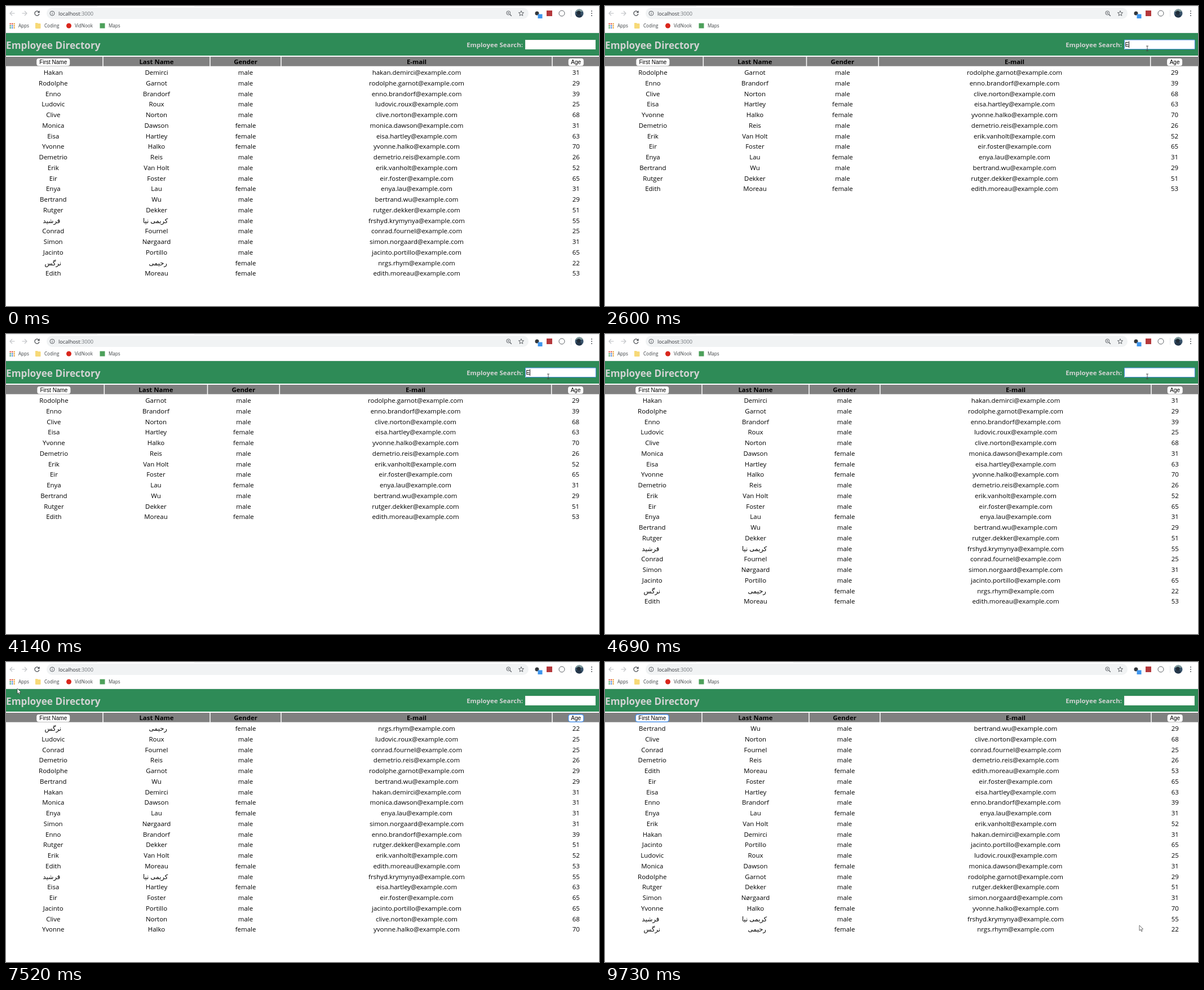
An HTML page with a canvas for the animation above (9.85 s loop, 1052 px wide and 532 px high).

```html
<!DOCTYPE html>
<html lang="en">
<head>
<meta charset="utf-8">
<title>Employee Directory</title>
<style>
html, body { margin: 0; width: 100%; height: 100%; overflow: hidden; background: #fff; }
canvas { display: block; width: 1052px; height: 532px; }
</style>
</head>
<body>
<canvas id="stage"></canvas>
<script>
const W = 1052, H = 532, LOOP = 9850;
const canvas = document.getElementById('stage');
const ctx = canvas.getContext('2d');
const dpr = window.devicePixelRatio || 1;
canvas.width = W * dpr;
canvas.height = H * dpr;

const SANS = '"Open Sans", "Noto Sans", "DejaVu Sans", sans-serif';
const UI = '"Liberation Sans", Arial, sans-serif';
const CELL = '11.46px ' + SANS;
const HEAD = 'bold 11.45px ' + SANS;
const BLUE = '#4a90e8';

const staff = `Hakan,Demirci,m,31
Rodolphe,Garnot,m,29
Enno,Brandorf,m,39
Ludovic,Roux,m,25
Clive,Norton,m,68
Monica,Dawson,f,31
Eisa,Hartley,f,63
Yvonne,Halko,f,70
Demetrio,Reis,m,26
Erik,Van Holt,m,52
Eir,Foster,m,65
Enya,Lau,f,31
Bertrand,Wu,m,29
Rutger,Dekker,m,51
فرشید,کریمی نیا,m,55,frshyd.krymynya
Conrad,Fournel,m,25
Simon,Nørgaard,m,31,simon.norgaard
Jacinto,Portillo,m,65
نرگس,رحیمی,f,22,nrgs.rhym
Edith,Moreau,f,53`.split('\n').map(line => {
  const [first, last, sex, age, mail] = line.split(',');
  const user = mail || `${first}.${last.replace(' ', '')}`.toLowerCase();
  return { first, last, gender: sex === 'm' ? 'male' : 'female', mail: user + '@example.com', age: +age };
});
const byAge = [...staff].sort((a, b) => a.age - b.age);
const byName = [...staff].sort((a, b) => (a.first < b.first ? -1 : 1));

// Column dividers for each search text
const dividers = {
  '': [172, 362, 488, 969],
  E: [174.3, 357.5, 485.3, 967.7],
  Ei: [183.5, 374.5, 509, 963],
  Eir: [191, 389.5, 529, 959]
};

// Stepped tracks: [start time, value]
const query = [[0, ''], [2600, 'E'], [2820, 'Ei'], [3040, 'Eir'], [4040, 'Ei'], [4140, 'E'], [4360, '']];
const focus = [[0, ''], [1720, 'search'], [6320, 'age'], [8420, 'first']];
const caret = [[0, 0], [1720, 1], [2270, 0], [2600, 1], [3590, 0], [4040, 1], [4690, 0], [5220, 1], [5770, 0], [6220, 1], [6320, 0]];
const rowsIn = [[0, staff], [6320, byAge], [8420, byName]];
const press = [[0, 0], [6220, 1], [6320, 0], [8300, 1], [8420, 0]];

// The pointer was sampled about every 110 ms
const glide = (start, ...points) =>
  points.map((p, i) => [start + i * 110, p]);
const rise = Array.from({ length: 9 }, (_, i) => {
  const u = i / 8, k = 1 - (1 - u) ** 1.4;
  return [991 - 25 * k, 525 - 442 * k];
});
const pointer = [
  [0, null],
  ...glide(290, ...rise),
  [1290, [964, 76, 'beam']], [1390, [962, 75, 'beam']],
  ...glide(5120, [986, 48], [995, 13]),
  ...glide(5450, [1000, 11], [1017, 60], [1014, 104], [1010, 107]),
  ...glide(5980, [1007, 106], [1004, 104]),
  [6870, [718, 53]], [6970, null],
  ...glide(7520, [20, 47], [6, 30], [20, 44], [45, 70], [66, 92], [72, 97]),
  [8300, [73, 98]],
  ...glide(9070, [140, 135], [420, 300], [705, 430, 'beam']),
  ...glide(9510, [725, 418], [850, 442], [948, 467])
];

function at(track, t) {
  let value = track[0][1];
  for (const [start, v] of track) if (t >= start) value = v;
  return value;
}

function text(str, x, y, font, color, align = 'left') {
  ctx.font = font;
  ctx.fillStyle = color;
  ctx.textAlign = align;
  ctx.fillText(str, x, y);
}

function rect(x, y, w, h, color) {
  ctx.fillStyle = color;
  ctx.fillRect(x, y, w, h);
}

function pill(x, y, w, h, r, fill, stroke, width = 1) {
  ctx.beginPath();
  ctx.roundRect(x, y, w, h, r);
  if (fill) { ctx.fillStyle = fill; ctx.fill(); }
  if (stroke) { ctx.strokeStyle = stroke; ctx.lineWidth = width; ctx.stroke(); }
}

function disc(x, y, r, fill, stroke) {
  ctx.beginPath();
  ctx.arc(x, y, r, 0, Math.PI * 2);
  if (fill) { ctx.fillStyle = fill; ctx.fill(); }
  if (stroke) { ctx.strokeStyle = stroke; ctx.lineWidth = 1; ctx.stroke(); }
}

function line(color, width, ...pts) {
  ctx.beginPath();
  pts.forEach(([x, y]) => ctx.lineTo(x, y));
  ctx.strokeStyle = color;
  ctx.lineWidth = width;
  ctx.stroke();
}

function star(cx, cy) {
  ctx.beginPath();
  for (let i = 0; i < 10; i++) {
    const a = -Math.PI / 2 + i * Math.PI / 5, r = i % 2 ? 2.1 : 4.8;
    ctx.lineTo(cx + r * Math.cos(a), cy + r * Math.sin(a));
  }
  ctx.closePath();
  ctx.strokeStyle = '#5f6368';
  ctx.lineWidth = 1;
  ctx.stroke();
}

function avatar() {
  ctx.save();
  ctx.beginPath();
  ctx.arc(1017, 13, 7.5, 0, Math.PI * 2);
  ctx.clip();
  rect(1009, 5, 16, 16, '#38536b');
  rect(1009, 5, 16, 5, '#7f9a9c');
  disc(1016, 12, 3.5, '#1e2a35');
  rect(1011, 15, 10, 6, '#24364a');
  ctx.restore();
}

function toolbar() {
  rect(0, 0, W, 1, '#eceef0');
  rect(162, 0, 172, 1, '#fff');
  const pale = '#bfc2c5', dark = '#5f6368';
  line(pale, 1.1, [15.5, 13], [7, 13]);
  line(pale, 1.1, [11, 9], [7, 13], [11, 17]);
  line(pale, 1.1, [28.5, 13], [37, 13]);
  line(pale, 1.1, [33, 9], [37, 13], [33, 17]);
  ctx.beginPath();
  ctx.arc(55, 13, 4, 0.25, Math.PI * 1.78);
  ctx.strokeStyle = '#4b4f54';
  ctx.lineWidth = 1.3;
  ctx.stroke();
  ctx.beginPath();
  ctx.moveTo(59.7, 8); ctx.lineTo(59.7, 12.2); ctx.lineTo(55.5, 12.2);
  ctx.fillStyle = '#4b4f54';
  ctx.fill();

  pill(72, 3, 855, 20, 10, '#f1f3f4');
  disc(82, 13, 4, null, dark);
  rect(81.5, 12.3, 1, 3, dark);
  rect(81.5, 10.5, 1, 1, dark);
  text('localhost', 93, 16.5, '9.2px ' + SANS, '#303338');
  const hostEnd = 93 + ctx.measureText('localhost').width;
  text(':3000', hostEnd, 16.5, '9.2px ' + SANS, '#70757a');
  disc(891.3, 12.3, 3.4, null, dark);
  line(dark, 1.3, [893.8, 14.8], [896.8, 17.8]);
  line(dark, 0.8, [889.6, 12.3], [893, 12.3]);
  line(dark, 0.8, [891.3, 10.6], [891.3, 14]);
  star(914, 13.3);

  disc(942, 13, 3.5, '#33373b');
  rect(943.5, 14.5, 8, 7.5, '#3f96ee');
  rect(959, 8, 10, 10, '#b5383c');
  disc(986, 13, 5, null, dark);
  rect(1002, 7, 1, 12, '#e3e5e7');
  avatar();
  for (const y of [9, 13, 17]) disc(1039, y, 1.1, dark);
}

function bookmarks() {
  const dots = ['#e05545', '#e05545', '#e8a33a', '#4aa564', '#4a86e0', '#e8a33a', '#4aa564', '#4a86e0', '#e8a33a'];
  dots.forEach((c, i) => rect(6.5 + (i % 3) * 3.5, 30.5 + Math.floor(i / 3) * 3.5, 2.3, 2.3, c));
  pill(52, 31, 9.5, 9, 1, '#f7d978');
  rect(52, 30, 4.5, 2, '#f7d978');
  disc(111.5, 35, 4.5, '#d9261c');
  rect(166.5, 30.5, 9, 9, '#4da05a');
  [['Apps', 22], ['Coding', 68], ['VidNook', 122], ['Maps', 182]].forEach(([label, x]) =>
    text(label, x, 38, '8.1px ' + SANS, '#3c4043'));
}

function banner(q, focused, caretOn) {
  rect(0, 47, W, 1, '#e6e8ea');
  rect(0, 48, W, 40, '#2e8b57');
  text('Employee Directory', 0, 76, 'bold 17.2px ' + SANS, '#d3d3d3');
  text('Employee Search:', 917, 73.3, HEAD, '#d3d3d3', 'right');
  rect(921, 60, 125, 17, '#eee');
  rect(922, 61, 123, 15, '#fff');
  if (focused) pill(921.5, 60, 125, 16.5, 1, null, BLUE);
  text(q, 922.6, 72, '10px ' + UI, '#000');
  const end = 922.6 + ctx.measureText(q).width;
  if (caretOn) rect(q ? Math.floor(end) : 923, 62.5, 1, 11.5, '#111');
}

function button(label, cx, w, focused) {
  pill(cx - w / 2, 93, w, 13.3, 4, '#fff', focused ? BLUE : null, 1.4);
  text(label, cx, 103.2, '10px ' + UI, '#000', 'center');
}

function table(rows, cuts, focused) {
  rect(0, 90, W, 16.7, '#808080');
  cuts.forEach(x => rect(x - 0.75, 89, 1.5, 18.5, '#fff'));
  const edges = [-4.5, ...cuts, W + 1.5];
  const mid = cuts.concat(0).map((_, i) => (edges[i] + edges[i + 1]) / 2);
  button('First Name', mid[0], 59, focused === 'first');
  ['Last Name', 'Gender', 'E-mail'].forEach((label, i) =>
    text(label, mid[i + 1], 103, HEAD, '#000', 'center'));
  button('Age', mid[4], 27, focused === 'age');
  rows.forEach((p, r) => {
    const y = 122 + r * 18.75;
    [p.first, p.last, p.gender, p.mail, p.age].forEach((value, i) =>
      text(value, mid[i], y, CELL, '#000', 'center'));
  });
}

function drawPointer(pos, pressed) {
  if (!pos) return;
  const [x, y, kind] = pos;
  if (pressed) disc(x, y + 1.5, 7.5, 'rgba(250, 225, 40, 0.82)');
  if (kind === 'beam') {
    line('#444', 0.9, [x, y - 4], [x, y + 4.5]);
    line('#444', 0.9, [x - 2, y - 4], [x + 2, y - 4]);
    line('#444', 0.9, [x - 2, y + 4.5], [x + 2, y + 4.5]);
    return;
  }
  const shape = [[0, 0], [0, 9.3], [2.2, 7.4], [3.7, 10.8], [5.2, 10.2], [3.8, 6.9], [6.6, 6.6]];
  ctx.beginPath();
  shape.forEach(([dx, dy]) => ctx.lineTo(x + dx, y + dy));
  ctx.closePath();
  ctx.fillStyle = '#fff';
  ctx.fill();
  ctx.strokeStyle = '#333';
  ctx.lineWidth = 0.7;
  ctx.stroke();
}

function draw(t) {
  const q = at(query, t), focused = at(focus, t);
  const rows = at(rowsIn, t).filter(p => p.first.toLowerCase().includes(q.toLowerCase()));
  ctx.setTransform(dpr, 0, 0, dpr, 0, 0);
  rect(0, 0, W, H, '#fff');
  toolbar();
  bookmarks();
  banner(q, focused === 'search', at(caret, t));
  table(rows, dividers[q], focused);
  drawPointer(at(pointer, t), at(press, t));
}

function frame(now) {
  draw(now % LOOP);
  requestAnimationFrame(frame);
}
requestAnimationFrame(frame);
</script>
</body>
</html>
```
